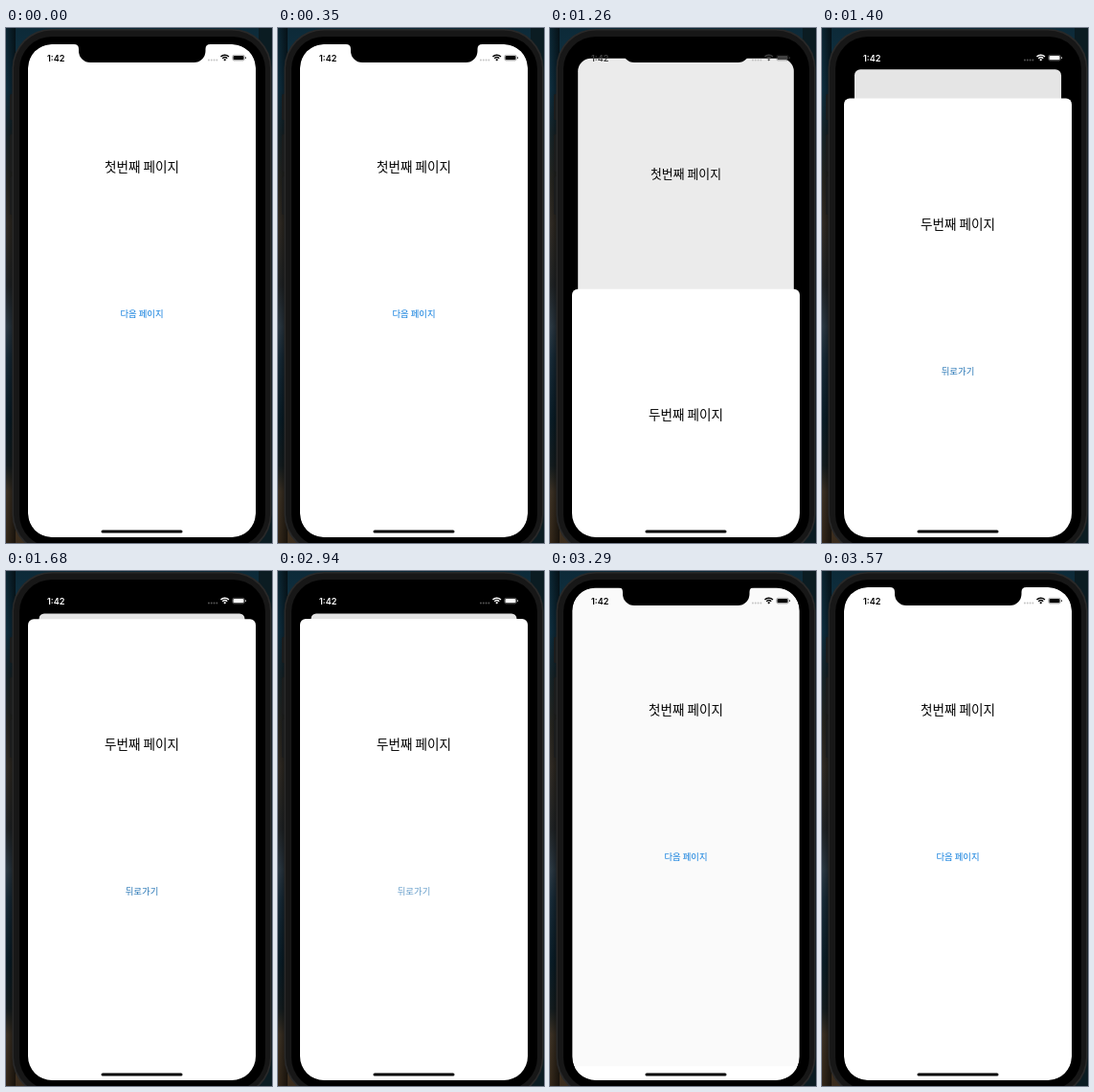
An HTML page with a canvas for the animation above (4830 ms loop, 278 by 538 pixels).

```html
<!DOCTYPE html>
<html lang="ko">
<head>
<meta charset="utf-8">
<style>
  html, body { margin: 0; height: 100%; overflow: hidden; background: #000; }
  canvas { display: block; width: 278px; height: 538px; }
</style>
</head>
<body>
<canvas id="stage" width="278" height="538"></canvas>
<script>
const ctx = document.getElementById('stage').getContext('2d');
const LOOP = 4830, STEP = 70;
const SCREEN = { x: 23, y: 17, w: 238, h: 515, r: 25 };
const CENTER = 142, SHEET_TOP = 50, SHEET_BOTTOM = 532;
const KOREAN = '"Noto Sans CJK KR", "Noto Sans CJK JP", "Noto Sans CJK", sans-serif';

const clamp = v => Math.min(1, Math.max(0, v));
const mix = (a, b, p) => a + (b - a) * p;

// Critically damped spring, as used for modal sheets
function spring(ms, omega) {
  const x = Math.max(0, ms) / 1000 * omega;
  return 1 - (1 + x) * Math.exp(-x);
}

function box(x, y, w, h, r, fill) {
  ctx.beginPath();
  ctx.roundRect(x, y, w, h, r);
  ctx.fillStyle = fill;
  ctx.fill();
}

function label(text, y, size, color = '#000', alpha = 1) {
  ctx.globalAlpha = alpha;
  ctx.font = `${size}px ${KOREAN}`;
  ctx.textAlign = 'center';
  ctx.fillStyle = color;
  ctx.fillText(text, CENTER, y + size * 0.37);
  ctx.globalAlpha = 1;
}

function gradient(x1, y1, stops) {
  const g = ctx.createLinearGradient(0, 0, x1, y1);
  for (const [at, color] of stops) g.addColorStop(at, color);
  return g;
}

function drawDesktop() {
  box(0, 0, 278, 538, 0, gradient(0, 538, [
    [0, '#0d2a38'], [0.12, '#103447'], [0.2, '#192a30'], [0.3, '#2b2a24'],
    [0.38, '#38322a'], [0.5, '#262a2c'], [0.58, '#32424e'], [0.64, '#1b3140'],
    [0.76, '#0b212d'], [0.85, '#182225'], [0.9, '#45392a'], [1, '#3a2c1c']
  ]));
  box(0, 0, 10, 538, 0, gradient(10, 0, [[0, 'rgba(0,0,0,.1)'], [1, 'rgba(0,0,0,.6)']]));
  box(264, 0, 14, 538, 0, '#0b1c22');
}

function drawBody() {
  for (const [y, h] of [[69, 27], [111, 39], [155, 40]]) box(4, y, 5, h, 1.5, '#1b1c1c');
  box(6.5, 1, 271, 548, 41, '#292929');
  box(8, 2.5, 268, 545, 40, '#171717');
  box(14, 9, 257, 533, 34, '#000');
}

function drawNotch() {
  ctx.beginPath();
  ctx.moveTo(71, 16);
  ctx.lineTo(71, 17);
  ctx.quadraticCurveTo(76, 17, 76, 22);
  ctx.arcTo(76, 36, 90, 36, 12);
  ctx.arcTo(208.5, 36, 208.5, 22, 12);
  ctx.lineTo(208.5, 22);
  ctx.quadraticCurveTo(208.5, 17, 213.5, 17);
  ctx.lineTo(213.5, 16);
  ctx.fillStyle = '#000';
  ctx.fill();
}

function drawStatus(light) {
  const v = Math.round(255 * light), color = `rgb(${v},${v},${v})`;
  ctx.font = '600 9.1px Inter, sans-serif';
  ctx.textAlign = 'left';
  ctx.fillStyle = color;
  ctx.fillText('1:42', 43, 34.5);

  const dot = light > 0.5 ? '#555' : '#c4c4c4';
  for (let i = 0; i < 4; i++) box(211 + i * 2.8, 32.6, 1.9, 1.9, 0.9, dot);

  ctx.strokeStyle = color;
  ctx.lineWidth = 1.4;
  for (const r of [3.4, 5.8]) {
    ctx.beginPath();
    ctx.arc(228.7, 34, r, -Math.PI * 0.76, -Math.PI * 0.24);
    ctx.stroke();
  }
  ctx.beginPath();
  ctx.moveTo(228.7, 34.4);
  ctx.arc(228.7, 34.4, 2, -Math.PI * 0.76, -Math.PI * 0.24);
  ctx.fillStyle = color;
  ctx.fill();

  ctx.beginPath();
  ctx.roundRect(236.7, 28.2, 12.6, 5.8, 1.8);
  ctx.globalAlpha = 0.4;
  ctx.lineWidth = 0.7;
  ctx.stroke();
  ctx.globalAlpha = 1;
  box(237.5, 29, 11, 4.2, 1, color);
  box(250, 30.2, 0.8, 1.9, 0.4, color);
}

function drawFirstPage(open, pressed) {
  const scale = mix(1, 215 / 238, open);
  const shade = Math.round(255 * (1 - 0.105 * Math.sqrt(open)));
  ctx.save();
  ctx.translate(CENTER, mix(17, 44.5, open));
  ctx.scale(scale, scale);
  ctx.translate(-CENTER, -17);
  box(SCREEN.x, SCREEN.y, SCREEN.w, SCREEN.h, mix(24, 6, open), `rgb(${shade},${shade},${shade})`);
  label('첫번째 페이지', 144.5, 13.6);
  label('다음 페이지', 298.5, 9.4, '#0d7ddd', pressed ? 0.7 : 1);
  ctx.restore();
}

function drawSheet(open, pressed) {
  const top = mix(SHEET_BOTTOM, SHEET_TOP, open);
  box(SCREEN.x, top, SCREEN.w, 500, 6, '#fff');
  label('두번째 페이지', top + 131.3, 13.6);
  label('뒤로가기', top + 284.5, 9.4, '#2474b4', pressed ? 0.7 : 1);
}

function draw(t) {
  let open = 0, light = 0;
  if (t < 2940) {
    open = spring(t - 1175, 21.2);
    light = clamp((t - 1225) / 140);
  } else if (t < 3570) {
    open = 1 - spring(t - 2998, 18.26);
    light = 1 - clamp((t - 3085) / 140);
  }

  drawDesktop();
  drawBody();
  ctx.save();
  ctx.beginPath();
  ctx.roundRect(SCREEN.x, SCREEN.y, SCREEN.w, SCREEN.h, SCREEN.r);
  ctx.clip();
  box(SCREEN.x, SCREEN.y, SCREEN.w, SCREEN.h, 0, '#000');
  drawFirstPage(open, t >= 1050 && t < 1260);
  if (open > 0) drawSheet(open, t >= 2940);
  ctx.restore();
  drawNotch();
  drawStatus(light);
  box(99.5, 524.4, 85, 3, 1.5, '#000');
}

function tick() {
  const t = performance.now() % LOOP;
  draw(Math.floor(t / STEP) * STEP);
  requestAnimationFrame(tick);
}
tick();
</script>
</body>
</html>
```
